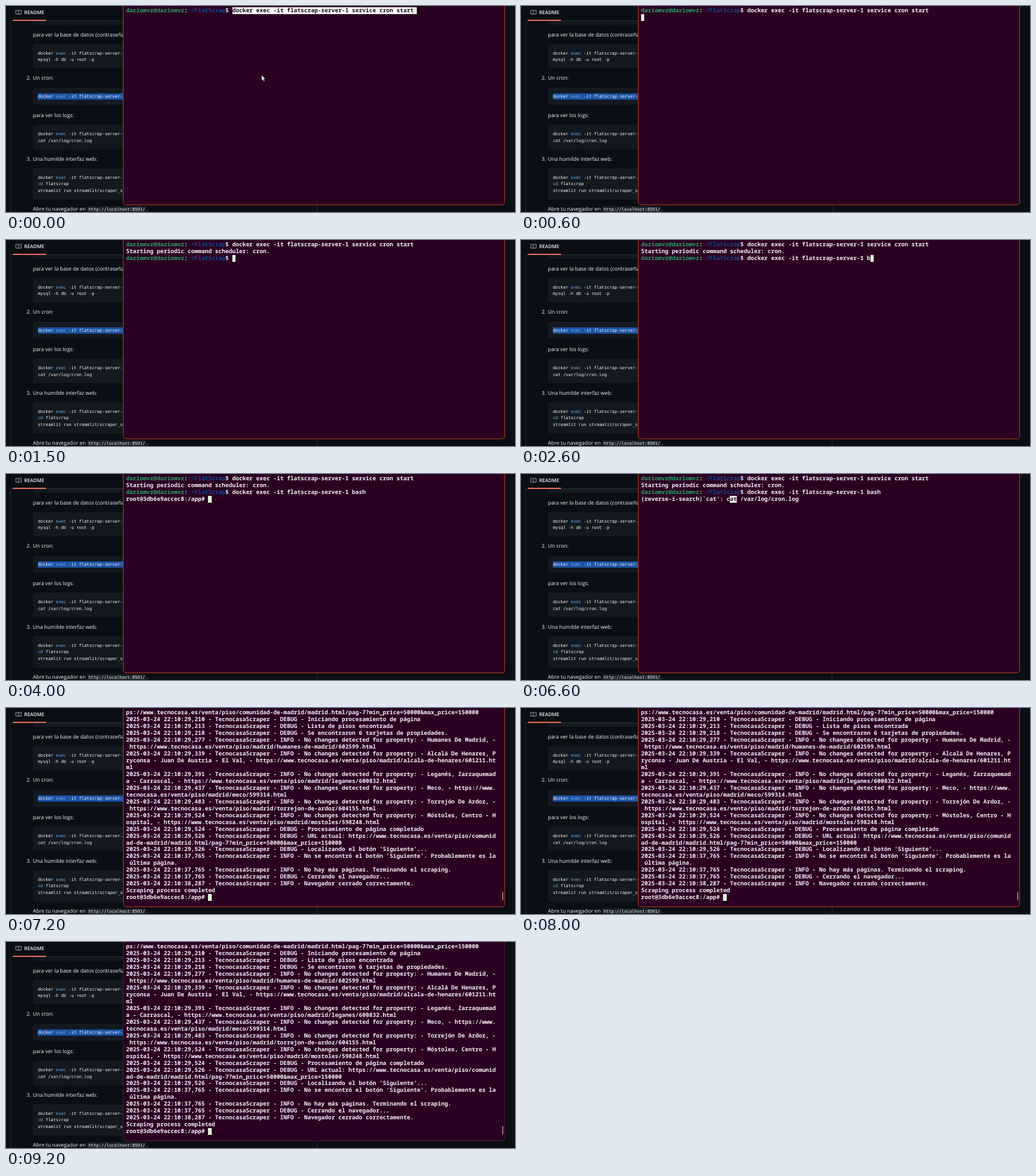
These frames come from a looping animation (814 by 330 pixels, 9300 ms). An HTML page:

```html
<!DOCTYPE html>
<html lang="es">
<head>
<meta charset="utf-8">
<title>Terminal</title>
<style>
html, body { margin: 0; width: 100%; height: 100%; overflow: hidden; background: #0b0e14; }
body { position: relative; text-rendering: geometricPrecision; color: #f2f6fb; }
body > * { position: absolute; box-sizing: border-box; }
.text, .code { height: 10px; line-height: 10px; white-space: pre; }
.text { font-family: "Open Sans", "Noto Sans", sans-serif; font-size: 8.4px; }
.code { font-family: "DejaVu Sans Mono", monospace; font-size: 6.83px; }
.code i { font-style: normal; color: #6cb2f0; }
.picked { background: #1d53a5; }
.tab { font-weight: 600; font-size: 7.9px; }
.block { left: 43px; width: 160px; background: #141920; border-radius: 3px; }
#page { left: 7px; top: 23px; width: 491px; height: 320px; border: 1px solid #272c34; }
#mark { left: 11px; top: 22px; width: 53px; height: 1.5px; background: #e0705a; }
#term {
  left: 187px; top: -10px; width: 611px; height: 329px;
  background: #2b0122; border: 1px solid #b23a1c; border-radius: 5px;
}
#term.idle { border-color: #43203c; }
#out {
  left: 192px; top: 2.4px; margin: 0; color: #f4f1f3;
  font: 600 9.13px/10.95px "Noto Sans Mono", "DejaVu Sans Mono", monospace;
}
#out span { display: inline-block; height: 10.95px; vertical-align: top; }
.user { color: #26a269; }
.path { color: #164a8c; }
.inv { background: #fff; color: #1d0618; }
.cur { background: #dcf0d8; color: #1d0618; }
#bar { left: 794px; top: 295px; width: 1.3px; height: 13px; background: #d8cdd5; }
</style>
</head>
<body>
<div id="page"></div>
<div id="mark"></div>
<svg style="left:15px;top:6px" width="10" height="9" viewBox="0 0 10 9" fill="none" stroke="#a4abb4" stroke-width=".9">
  <path d="M5 1.8Q4.4 1 3 1H.7V7H3.4Q4.6 7 5 8Q5.4 7 6.6 7H9.3V1H7Q5.6 1 5 1.8V7.6"/>
</svg>
<div id="term"></div>
<pre id="out"></pre>
<div id="bar"></div>
<svg id="mouse" style="left:407.5px;top:110px" width="9" height="13" viewBox="0 0 9 13">
  <path d="M.8 .8V9.6L2.8 7.8L4.2 11.1L5.7 10.4L4.3 7.3H6.9Z" fill="#fff" stroke="#111" stroke-width=".6"/>
</svg>
<script>
const LOOP = 9300, COLS = 108;
const $ = id => document.getElementById(id);

// Page behind the terminal
function put(cls, x, y, html, style = "") {
  $("term").insertAdjacentHTML("beforebegin",
    `<div class="${cls}" style="left:${x}px;top:${y - 4.5}px;${style}">${html}</div>`);
}
function block(top, bottom) {
  $("term").insertAdjacentHTML("beforebegin",
    `<div class="block" style="top:${top}px;height:${bottom - top}px"></div>`);
}
const run = "docker <i>exec</i> -it flatscrap-server-1 ";
[[24, 30], [61, 100], [131, 158], [190, 229], [260, 310]].forEach(b => block(...b));
put("text tab", 29, 10, "README");
put("text", 43, 46, "para ver la base de datos (contraseña");
put("code", 51, 75, run + "bash");
put("code", 51, 85.5, "mysql -h db -u root -p");
put("text", 33, 115, "2.");
put("text", 43, 115, "Un cron:");
put("code picked", 51, 144.5, run + "service cron start");
put("text", 43, 175, "para ver los logs:");
put("code", 51, 204.5, run + "bash");
put("code", 51, 215, "cat /var/log/cron.log");
put("text", 33, 245, "3.");
put("text", 43, 245, "Una humilde interfaz web:");
put("code", 51, 274, run + "bash");
put("code", 51, 284.5, "<i>cd</i> flatscrap");
put("code", 51, 295, "streamlit run streamlit/scraper_s");
put("text", 43, 325, "Abre tu navegador en");
put("code", 130, 325.5, "http://localhost:8501/", "background:#1e232b;padding:0 2px;border-radius:2px");
put("text", 225, 325, ".");

// Terminal content
const esc = s => s.replace(/&/g, "&amp;");
const span = (cls, s) => `<span class="${cls}">${s}</span>`;
const cursor = span("cur", " ");
const who = "dariomvz";
const prompt = span("user", `${who}@${who}`) + ":" + span("path", "~/FlatScrap") + "$ ";
const base = "docker exec -it flatscrap-server-1 ";
const start = "service cron start";
const root = "root@3db6e9accec8:/app# ";
const done = prompt + base + start;
const site = "https://www.tecnocasa.es/venta/piso/";
const list = site + "comunidad-de-madrid/madrid.html/pag-7?min_price=50000&max_price=150000";

const log = (time, level, msg) => `2025-03-24 22:10:${time} - TecnocasaScraper - ${level} - ${msg}`;
const same = (time, place, url) =>
  log(time, "INFO", `No changes detected for property: - ${place}, - ${site}madrid/${url}.html`);

const logs = [
  list.slice(3),
  log("29,210", "DEBUG", "Iniciando procesamiento de página"),
  log("29,213", "DEBUG", "Lista de pisos encontrada"),
  log("29,218", "DEBUG", "Se encontraron 6 tarjetas de propiedades."),
  same("29,277", "Humanes De Madrid", "humanes-de-madrid/602599"),
  same("29,339", "Alcalá De Henares, Pryconsa - Juan De Austria - El Val", "alcala-de-henares/601211"),
  same("29,391", "Leganés, Zarzaquemada - Carrascal", "leganes/600832"),
  same("29,437", "Meco", "meco/599314"),
  same("29,483", "Torrejón De Ardoz", "torrejon-de-ardoz/604155"),
  same("29,524", "Móstoles, Centro - Hospital", "mostoles/598248"),
  log("29,524", "DEBUG", "Procesamiento de página completado"),
  log("29,526", "DEBUG", "URL actual: " + list),
  log("29,526", "DEBUG", "Localizando el botón 'Siguiente'..."),
  log("37,765", "INFO", "No se encontró el botón 'Siguiente'. Probablemente es la última página."),
  log("37,765", "INFO", "No hay más páginas. Terminando el scraping."),
  log("37,765", "DEBUG", "Cerrando el navegador..."),
  log("38,287", "INFO", "Navegador cerrado correctamente."),
  "Scraping process completed"
];
const wrap = s => s.match(new RegExp(`.{1,${COLS}}`, "g")).map(esc);
const logScreen = [...logs.flatMap(wrap), root + cursor];

// Second command: recalled from history, erased, then "bash"
function edited(t) {
  if (t < 1600) return "";
  if (t < 2400) return base + start.slice(0, Math.round(start.length * (2300 - t) / 700));
  const typed = [2500, 2700, 2800, 3000].filter(k => t >= k).length;
  return base + "bash".slice(0, typed);
}

function search(t) {
  const n = [6300, 6400, 6600].filter(k => t >= k).length;
  const key = "cat".slice(0, n);
  const head = "(reverse-i-search)`" + key + "': ";
  if (!n) return head + cursor;
  const first = n < 3 ? span("cur", "c") : "c";
  const rest = key.slice(1);
  return head + first + (rest && span("inv", rest)) + "cat /var/log/cron.log".slice(n);
}

function screen(t) {
  if (t < 300) return [prompt + span("inv", base + start) + cursor];
  if (t < 700) return [done, cursor];
  const top = [done, "Starting periodic command scheduler: cron."];
  if (t < 800) return [...top, cursor];
  if (t < 3700) return [...top, prompt + edited(t) + cursor];
  if (t >= 7200) return logScreen;
  top.push(prompt + base + "bash");
  if (t < 3900) return [...top, cursor];
  return [...top, t < 6000 ? root + cursor : search(t)];
}

let shown = "";
function frame(now) {
  const t = Math.floor(now % LOOP / 100) * 100;
  const html = screen(t).join("\n");
  if (html !== shown) $("out").innerHTML = shown = html;
  $("mouse").style.display = t < 300 ? "" : "none";
  $("bar").style.display = t >= 7200 ? "" : "none";
  $("term").className = t >= 9200 ? "idle" : "";
  requestAnimationFrame(frame);
}
frame(performance.now());
</script>
</body>
</html>
```
